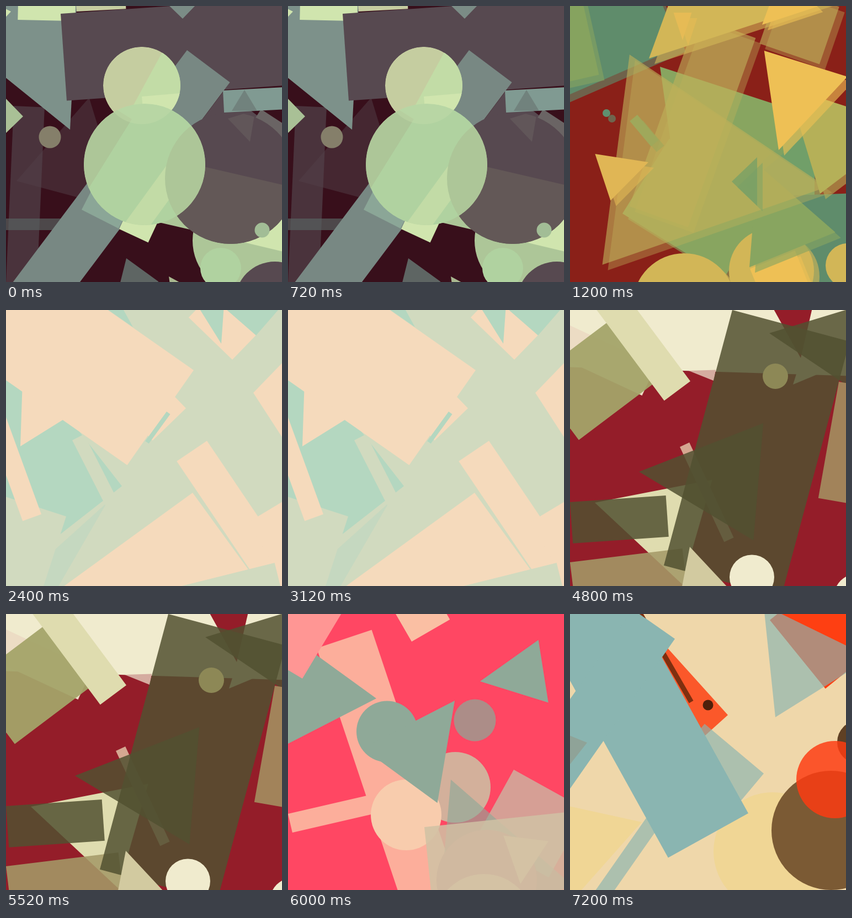
Write an HTML page that moves like this. It is 500 by 500 pixels and loops after 8000 ms.

```html
<!DOCTYPE html>
<html lang="en">
<head>
<meta charset="utf-8">
<title>Paper shapes</title>
<style>
html, body { margin: 0; width: 100%; height: 100%; overflow: hidden; }
svg { display: block; width: 100vw; height: 100vh; }
</style>
</head>
<body>
<svg id="stage" viewBox="0 0 500 500"></svg>
<script>
const NS = 'http://www.w3.org/2000/svg';
const stage = document.getElementById('stage');
const scenes = [];
let parent = stage, clips = 0, echo = 0;

function add(tag, attrs, to = parent) {
  const el = document.createElementNS(NS, tag);
  for (const k in attrs) el.setAttribute(k, attrs[k]);
  return to.appendChild(el);
}

// Each shape is an SVG path; overlapping translucent paint makes the mixed tones.
const path = pts => 'M' + pts.map(p => p.map(v => v.toFixed(1))).join('L') + 'Z';

function step([x, y], len, deg) {
  const a = deg * Math.PI / 180;
  return [x + len * Math.cos(a), y + len * Math.sin(a)];
}

function disc(x, y, r) {
  return `M${x - r},${y}a${r},${r} 0 1 1 ${2 * r},0a${r},${r} 0 1 1 ${-2 * r},0Z`;
}

// Corner, first side along deg, second side a quarter turn clockwise.
function rect(x, y, w, h, deg = 0) {
  const a = [x, y], b = step(a, w, deg);
  return path([a, b, step(b, h, deg + 90), step(a, h, deg + 90)]);
}

// Isosceles: tip, height, base, direction from the tip to the base.
function tri(x, y, h, base, deg) {
  const mid = step([x, y], h, deg);
  return path([[x, y], step(mid, base / 2, deg - 90), step(mid, base / 2, deg + 90)]);
}

function fill(color, ...shapes) {
  for (const d of shapes) {
    if (echo) add('path', { d, fill: color, opacity: 0.62, transform: `translate(${echo} ${echo})` });
    add('path', { d, fill: color });
  }
}

function inside(d, draw) {
  const id = 'clip' + clips++, outer = parent;
  add('path', { d }, add('clipPath', { id }));
  parent = add('g', { 'clip-path': `url(#${id})` });
  draw();
  parent = outer;
}

function scene(bg, draw, shift = 0) {
  parent = add('g', { display: 'none' }, stage);
  scenes.push(parent);
  echo = shift;
  add('rect', { width: 500, height: 500, fill: bg });
  draw();
}

// Plum and mint
scene('#380f1b', () => {
  const plum = '#574950', teal = '#7b8c86', lime = '#d0e5ae', mint = '#b0d2a0', moss = '#adc698', tan = '#c5cda0';
  const head = disc(246, 144, 70), body = disc(251, 287, 110), ball = disc(407, 312, 119);
  fill('#4a333c', rect(14, 181, 56, 330, 2.5));
  fill('#52404880', tri(19, 317, 170, 212, -17));
  fill('#7d918a', tri(116, 224, 300, 306, 246));
  fill(lime, rect(23, -50, 104, 75, 1.3), tri(9, 10, 20, 30, 170));
  fill(tan, rect(126, -20, 90, 30, -3));
  fill('#a9c096', rect(31, 200, 60, 60, 136));
  fill(plum, rect(99, 14, 420, 158, -4), rect(395, 153, 130, -130, 127));
  fill(teal, rect(320, 23, 60, 60, 224));
  fill('#6a6464', rect(462, 187, 90, 60, 33));
  fill('#809a92', rect(393, 153, 120, 40, -3));
  fill('#71827d', tri(432, 152, 38, 46, 90));
  fill('#586260b0', rect(0, 385, 178, 21));
  fill('#788883', rect(328, 80, 97, 560, 36.9));
  fill(moss, rect(273, 391, 80, -60, 13));
  fill(lime, rect(205, 404, 58, -120, 25));
  fill('#8ba697', rect(137, 369, 75, -50, 27));
  inside(disc(435, 425, 97), () => fill(moss, rect(300, 300, 200, 200)));
  fill(lime, rect(410, 423, 120, -70, 13.4));
  inside(ball, () => {
    fill(plum, ball);
    fill('#635857', rect(280, 273, 260, 200, 13));
    fill('#615659', tri(442, 246, 52, 52, -107));
  });
  fill('#5e6563', tri(218, 457, 60, 81, 70));
  fill('#a9b890', tri(295, 490, 30, 30, 55));
  fill(mint, disc(389, 475, 37));
  fill('#a2bd96', disc(464, 406, 13.5));
  fill('#857f6a', disc(79.5, 237.5, 20));
  fill(plum, disc(487, 535, 72));
  inside(head, () => {
    fill(tan, head);
    fill('#c2dca6', rect(284, 82, 165, -120, 118.6));
    fill(lime, rect(246, 164, 90, 60, -5));
  });
  inside(body, () => {
    fill(mint, body);
    fill(moss, rect(228, 205, 150, 60, 122));
    fill('#c2dba6', rect(290, 290, 140, -40, 126));
    fill(moss, ball);
    fill('#c5dcaa60', head);
  });
});

// Brick, amber and green; every piece has an offset echo
scene('#8a2018', () => {
  const teal = '#5f8c6b', green = '#88a560', tan = '#bfb05a9e', gold = '#d2b657', amber = '#eec055';
  fill(teal, rect(200, 73, 260, 200, 156.5));
  fill('#86a35f', rect(22, -12, 140, 80, 77.4));
  fill(tan, rect(379, -36, 115, 110, 19));
  fill('#719f69', tri(293, 318, 150, 280, 0));
  fill(green, rect(95, 376, 218, -160, 32), tri(163, 110, 250, 312, 50));
  fill(teal, rect(405, 343, 150, 160, -2));
  fill(gold, disc(207, 541, 93), disc(365, 480, 77));
  fill(amber, rect(326, 476, 88, 100, -22));
  fill(green, tri(340, 287, 167, 168, 67.9));
  fill(tan, rect(230, 20, 113, 364, 19.7), tri(465, 328, 385, 384, 187.4));
  fill('#76a067c0', tri(293, 318, 46, 88, 0));
  fill('#9fa85b', rect(122, 197, 18, -60, 140));
  fill('#b5b058', tri(453, 340, 165, 230, -72));
  fill(gold, tri(143, 95, 400, 390, -44));
  fill(amber, tri(348, 34, 95, 92, -44));
  fill('#e6bb55', tri(204, 62, 50, 33, -90));
  fill(amber, tri(378, 261, 164, 158, -72.6));
  fill('#e0b655', tri(142, 283, 87, 89, 161.7));
  fill(gold, disc(503, 470, 40));
  fill('#5f9070', disc(66, 194, 7));
}, 10);

// Peach and sage
scene('#d1dabf', () => {
  const mint = '#b4d7c0', peach = '#f5dabc', sage = '#d1dabf';
  fill(mint, rect(210, 319, 280, 290, 142), tri(230, 31, 60, 28, 228));
  fill('#c5d8c0', tri(182, 350, 190, 60, 129));
  fill(sage, rect(109, 374, 200, 150, 108), rect(120, 236, 24, 254, -27));
  fill(peach, rect(340, 109, 210, 420, 125), tri(26, 247, 90, 96, -60), rect(326, 178, 84, 30, 136),
    rect(64, 370, 36, 240, 160), rect(410, 90, 62, -110, -46), tri(448, 150, 60, 151, 5.5));
  fill(mint, rect(291, 184, 66, -8, 126), tri(390, 61, 120, 78, 256), rect(453, 46, 70, 70, 221));
  fill(peach, rect(338, 331, 300, -250, 144), rect(364, 237, 300, 66, 56), rect(438, 385, 100, 200, -31));
  fill(sage, rect(310, 502, 182, 60, -14));
});

// Apricot and lemon
scene('#fddf7f', () => {
  const peach = '#fbd6a5', orange = '#ffb680', white = '#eee9e3', cream = '#f1e3d0', pink = '#ffa99b', amber = '#fdc187';
  const left = tri(33, 331, 420, 439, 245.6), right = tri(496, 392, 320, 440, 295);
  const band = rect(0, 129, 370, 80, 8.5), strip = rect(0, 228, 160, 29, 25.4);
  fill(white, band);
  fill('#fbd6a5b0', tri(95, 237, 130, 175, 17));
  fill(peach, tri(58, 75, 286, 284, 12.7), tri(143, 412, 170, 296, 198));
  fill(cream, strip, rect(0, 477, 131, 30, -1));
  fill(amber, tri(143, 413, 190, 194, 184));
  inside(left, () => {
    fill('#ffb484', left);
    fill(pink, rect(0, 210, 60, 140, 8.5));
    fill('#fdb0aa', band, strip);
  });
  fill(cream, rect(370, 345, 140, 160));
  fill('#f4ddc6', rect(423, 433, 90, 80, 6));
  fill(peach, rect(370, 402, 200, -160, -42));
  fill(white, disc(254, 480, 125));
  fill(amber, rect(440, 155, 60, 80, -2));
  fill('#fbc794', disc(472, 230, 31));
  inside(rect(435, 236, 70, 40, -2), () => fill(white, disc(472, 230, 31)));
  inside(right, () => {
    fill(orange, right);
    fill(pink, rect(430, 235, 100, 180, -2));
  });
  fill(pink, tri(450, 28, 80, 75, -10));
  fill('#ffb680d0', tri(155, 208, 225, 228, 48.9));
  fill('#ffb77f', tri(452, 112, 342, 343.5, 121.9));
  fill('#fec38e', disc(245, 279, 28));
});

// Crimson and olive
scene('#941d29', () => {
  const cream = '#f0ebce', straw = '#dfdcaf', dark = '#525131d8';
  fill(cream, rect(-10, -60, 540, 163, 1.8), tri(404, 135, 100, 93, -47.5));
  fill('#ecdcc4', rect(0, 28, 172, 60, 25));
  fill('#941d29', tri(418, 87, 130, 100, 262));
  fill('#a4a46af0', rect(92, 4, 200, -139, 143));
  fill('#d5aca0', tri(215, 110, 48, 20, 10));
  fill(straw, rect(218, 129, 59, 240, 143.3), tri(45, 349, 193, 197, 16));
  fill('#a59a68de', rect(0, 457, 205, 80, -7));
  fill('#d5a791', rect(199, 248, 19, 190, -25));
  fill(dark, rect(294, 0, 220, 479, 15), tri(125, 293, 217, 213, 4.8),
    rect(0, 348, 174, 75, -4), tri(361, 42, 180, 171, 8.5));
  fill('#d2caa0', tri(217, 429, 90, 92, 74));
  fill('#8d8856', disc(372, 120, 23));
  fill('#a2835a', rect(487, 130, 100, 214, 10));
  fill(cream, disc(329.5, 484, 40.5), disc(520, 520, 42));
});

// Coral and sea green
scene('#ff4763', () => {
  const sea = '#8fa998';
  fill('#fcae9b', rect(52, 62, 105, 520, -18.5), rect(0, 362, 220, 35, -13));
  fill('#fabfa3', rect(224, 50, 120, 80, 240));
  fill(sea, tri(160, 153, 180, 221, 184.4), tri(348, 122, 116, 115, -9));
  fill('#ff9694', rect(26, 117, 160, -100, -59));
  fill('#ac8d88', disc(338.5, 192.5, 38));
  fill('#d69f95', rect(409, 282, 150, 140, 29));
  fill('#d3b09b', disc(303, 314, 64));
  fill('#8fa998a0', tri(295, 300, 260, 265, 68));
  fill('#f8ccad', disc(214, 364, 64));
  fill(sea, disc(179.5, 213, 55.5), tri(302, 157, 168, 168, 126.2));
  fill('#d0c2a4d8', rect(247, 386, 270, 140, -6));
  fill('#d0b9a0', disc(360, 482, 91));
  fill('#d4c2a4', disc(355, 561, 90), tri(421, 489, 83, 82.5, -83));
});

// Sand, teal and flame
scene('#efd7aa', () => {
  const teal = '#8ab5b1', mist = '#8ab5b1a8', yellow = '#f0d695', flame = '#fb582a';
  fill(yellow, tri(130, 377, 220, 258, 162), disc(367, 430, 107));
  fill(flame, rect(286, 183, 90, 165, 138));
  fill('#fe3f12', rect(362, 11, 160, -200, 51));
  fill(mist, rect(158, 341, 28, 300, 35), rect(351, 289, 80, 140, 130), tri(372, 187, 173, 216, 296));
  fill('#7e2f0f', rect(130, -5, 187, 9, 60));
  fill(teal, rect(323, 361, 166, 520, 151), rect(190, 45, 400, 93, 125));
  fill('#8fa398', tri(31, 233, 40, 60, 165));
  fill('#4f200b', disc(250, 165, 9.5));
  fill('#5f4024', disc(523, 232, 39));
  fill('#7b5a34', disc(473, 392, 108));
  fill('#fe3c12d4', disc(480, 300, 70));
});

const LOOP = 8000, HOLD = 1200;
const start = performance.now();
let shown = -1;

function render(ms) {
  const now = Math.min(scenes.length - 1, Math.floor((ms % LOOP) / HOLD));
  if (now === shown) return;
  scenes.forEach((g, i) => g.setAttribute('display', i === now ? 'inline' : 'none'));
  shown = now;
}

function tick() {
  render(performance.now() - start);
  requestAnimationFrame(tick);
}

tick();
</script>
</body>
</html>
```
